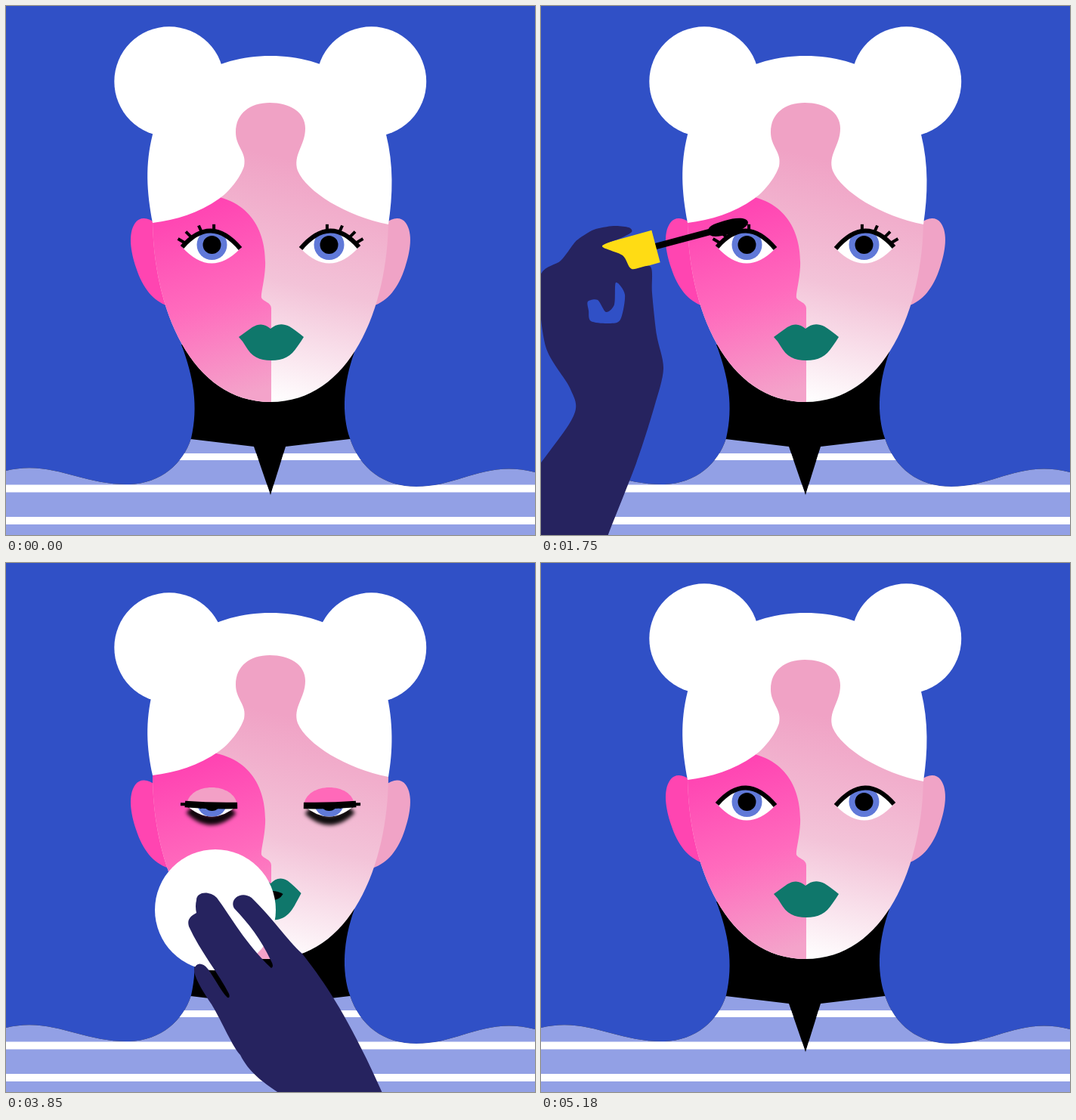
These frames come from a looping animation (700x700 px, 5250 ms). An HTML page with a canvas:

```html
<!DOCTYPE html>
<html>
<head>
<meta charset="utf-8">
<style>
html, body { margin: 0; width: 100%; height: 100%; overflow: hidden; background: #3050c6; }
canvas { display: block; }
</style>
</head>
<body>
<canvas id="stage" width="700" height="700"></canvas>
<script>
const ctx = document.getElementById('stage').getContext('2d');
const LOOP = 5250, STEP = 70;
const NAVY = '#26235f', BLUE = '#3050c6';

const body = new Path2D('M0 615C60 600 100 634 163 633C205 632 235 605 245 572C255 530 248 490 232 448L461 458C446 500 444 540 455 572C468 612 500 636 543 636C600 636 635 600 700 617V700H0Z');
const shirt = new Path2D('M0 573H244L328 583L350 647L370 583L455 573H700V700H0Z');
const face = new Path2D('M194 280C194 400 245 524 350 524C455 524 506 400 506 280L400 110H300Z');
const shade = new Path2D('M250 249C320 249 345 295 343 345C342 365 337 380 338 386C340 391 351 392 351 400V530H180V249Z');
const ear = new Path2D('M198 288C188 279 177 279 171 287C161 301 165 325 172 346C181 374 195 390 214 397Z');
const lips = new Path2D('M308 438Q319 430 326 425C336 419 343 421 350 427C357 421 365 419 375 424Q383 429 394 438Q391 443 386 450C377 464 367 469 351 469C335 469 325 464 317 450Q313 443 308 438Z');
const mouth = new Path2D('M334 441Q351 431 368 439Q358 452 334 441Z');
const wiper = new Path2D('M-25 -13C-25 -24 -8 -26 2 -16C20 8 40 45 74 77Q78 75 74 68C60 38 44 18 25 -2C18 -14 34 -26 48 -16C75 10 95 40 115 58C140 90 165 125 200 197C230 260 255 320 280 382L420 760H200L141 382C138 340 125 275 101 254C75 235 48 222 33 192C22 180 10 150 -5 125C-15 110 -25 95 -28 82C-28 70 -18 68 -10 78C0 92 8 108 16 116Q20 117 18 111C5 85 -20 55 -35 22C-38 12 -32 8 -25 4Q-27 -5 -25 -13Z');

// Two poses of the hand holding the wand, relative to the stage
const fistA = [-260,600, 0,433, 45,406, 62,375, 72,325, 110,275, 152,234, 178,234, 190,233, 212,232, 240,236, 268,253, 279,267,
  268,276, 238,264, 248,288, 250,306, 273,306, 255,338, 212,396, 185,437, 150,456, 100,505, 0,618, -150,790];
const fistB = [-160,800, 0,592, 46,525, 40,490, 8,435, 0,345, 28,322, 45,300, 52,293, 72,281, 98,276, 118,278, 122,284,
  108,292, 83,303, 110,315, 122,333, 147,330, 149,365, 155,420, 164,465, 152,515, 128,590, 85,700, 50,800];
const gapA = [172,303, 160,322, 165,338, 188,347, 207,340, 217,311, 204,317, 205,332, 186,333, 177,318];
const gapB = [64,376, 65,388, 68,402, 92,405, 107,400, 113,367, 101,351, 99,380, 88,390, 77,374];
const gripA = [319, 283], gripB = [154, 303];

// time, grip x, grip y, turn from pose A to pose B
const wandKeys = [[70,-150,430,0], [490,318,300,0], [560,332,298,0], [770,322,283,0], [980,350,300,0], [1260,319,283,0],
  [1470,345,296,0], [1750,152,318,1], [1960,154,303,1], [2130,150,316,1], [2310,154,303,1], [2870,-170,480,1]];
// time, pad x, pad y
const padKeys = [[3430,250,800], [3710,266,486], [3850,277,459], [3990,300,440], [4130,285,400], [4340,312,318], [4480,375,312],
  [4620,432,320], [4760,425,345], [4900,400,480], [5040,344,632], [5110,268,690], [5180,240,800]];
const tiltKeys = [[2870,0], [3360,1], [3990,1], [4480,0]];
const openKeys = [[2730,1], [2940,.42], [3850,.45], [4060,0], [4760,0], [4970,1]];
const mouthKeys = [[3640,0], [3850,1], [4060,1], [4270,0]];

// Bezier place, lean and reach of each lash, raised and lowered
const lashes = [[.06,-10,-6,5], [.17,-8,-8,10], [.34,-4,-9,14], [.55,0,-9,14], [.7,3,0,14], [.86,5,0,11]];

const mix = (a, b, u) => a + (b - a) * u;
const smooth = u => u * u * (3 - 2 * u);

function track(keys, t, ease = smooth) {
  if (t <= keys[0][0]) return keys[0].slice(1);
  const i = keys.findIndex(k => k[0] > t);
  if (i < 0) return keys.at(-1).slice(1);
  const a = keys[i - 1], b = keys[i], u = ease((t - a[0]) / (b[0] - a[0]));
  return a.slice(1).map((v, n) => mix(v, b[n + 1], u));
}

function fill(path, color, rule = 'nonzero') {
  ctx.fillStyle = color;
  ctx.fill(path, rule);
}

function disc(x, y, rx, color, ry = rx) {
  const p = new Path2D();
  p.ellipse(x, y, rx, ry, 0, 0, 7);
  fill(p, color);
}

function line(path, width, color = '#000') {
  ctx.lineWidth = width;
  ctx.strokeStyle = color;
  ctx.stroke(path);
}

function group(draw) {
  ctx.save();
  draw();
  ctx.restore();
}

const mirror = draw => group(() => {
  ctx.translate(700, 0);
  ctx.scale(-1, 1);
  draw();
});

function ramp(x0, y0, x1, y1, ...colors) {
  const g = ctx.createLinearGradient(x0, y0, x1, y1);
  colors.forEach((c, i) => g.addColorStop(i / (colors.length - 1), c));
  return g;
}
const skin = ramp(425, 215, 350, 524, '#f0a2c5', '#f3c3d8', '#ffffff');
const blush = ramp(225, 270, 300, 520, '#ff43b2', '#ff6bbd', '#f4a3ca');

function drawBody() {
  group(() => {
    ctx.clip(body);
    ctx.fillStyle = '#000';
    ctx.fillRect(0, 440, 700, 260);
    ctx.clip(shirt);
    ctx.fillStyle = '#92a0e5';
    ctx.fillRect(0, 570, 700, 130);
    ctx.fillStyle = '#fff';
    for (const [y, h] of [[592, 9], [633.5, 10], [676, 10]]) ctx.fillRect(0, y, 700, h);
  });
}

function drawHair(tilt) {
  const y = v => v - 6 * tilt;
  disc(216, 100 + 12 * tilt, 72.7, '#fff');
  disc(483.5, 100 + 12 * tilt, 72.7, '#fff');
  fill(new Path2D(`M194 ${y(287)}C186 245 184 210 194 170C212 105 275 66 350 66C425 66 488 105 503 170C513 210 512 250 506 ${y(289)}
    C450 ${y(278)} 398 ${y(246)} 386 ${y(218)}C379 ${y(197)} 396 ${y(185)} 396 ${y(162)}C396 ${y(140)} 375 ${y(128)} 349 ${y(128)}
    C323 ${y(128)} 304 ${y(142)} 304 ${y(167)}C304 ${y(187)} 319 ${y(193)} 315 ${y(212)}C310 ${y(228)} 294 ${y(247)} 282 ${y(255)}
    C255 ${y(274)} 225 ${y(283)} 194 ${y(287)}Z`), '#fff');
}

function drawEye(open, lashed, lidColor) {
  const shut = 1 - open, top = mix(275, 360, shut), low = Math.max(top, 361 - 18 * shut);
  const inset = Math.min(4, shut * 7), x0 = 233 + inset, x1 = 310 - inset;
  const lid = new Path2D(`M${x0} 319Q271 ${top} ${x1} 321`);
  const ball = new Path2D(`M${x0} 319Q271 ${top} ${x1} 321Q271 ${low} ${x0} 319Z`);
  if (lashed && shut > .05) group(() => {
    ctx.filter = 'blur(2.5px)';
    ctx.globalAlpha = Math.min(1, shut * 1.7);
    line(new Path2D(`M${x0 + 6} 326Q271 ${low + 3} ${x1 - 6} 327`), 13);
  });
  if (shut > .2) fill(new Path2D(`M239 321C241 289 303 289 306 321Q271 ${top} 239 321Z`), lidColor);
  group(() => {
    ctx.clip(ball);
    ctx.fillStyle = '#fff';
    ctx.fillRect(220, 280, 100, 70);
    disc(272.5, 316, 20, '#6079d8');
    disc(272.5, 316, 12, '#000');
  });
  line(lid, 6 + 5 * shut);
  if (!lashed) return;
  lashes.forEach(([u, dx, up, down], i) => {
    if (i > 3 && open > .3) return;
    const v = 1 - u;
    const x = v * v * x0 + 2 * u * v * 271 + u * u * x1;
    const y = v * v * 319 + 2 * u * v * top + u * u * 321;
    line(new Path2D(`M${x} ${y}l${dx} ${mix(up, down, shut)}`), 4);
  });
}

function drawHead(t) {
  const [tilt] = track(tiltKeys, t), [open] = track(openKeys, t), [part] = track(mouthKeys, t);
  group(() => {
    ctx.translate(0, 6.5 * tilt);
    fill(ear, '#ff45b1');
    mirror(() => fill(ear, '#f0a3c6'));
  });
  fill(face, skin);
  group(() => {
    ctx.clip(face);
    fill(shade, blush);
  });
  drawHair(tilt);
  drawEye(open, t < 4410, '#f3a0c6');
  mirror(() => drawEye(open, t < 4690, '#ff69b9'));
  group(() => {
    ctx.translate(351, 445);
    ctx.scale(1 - .08 * part, 1 + .15 * part);
    ctx.translate(-351, -445);
    fill(lips, '#0f776b');
    ctx.globalAlpha = part;
    fill(mouth, '#000');
  });
}

// Closed smooth curve through a flat list of points
function addLoop(path, pts) {
  const n = pts.length / 2;
  const p = (i, c) => pts[(i + n) % n * 2 + c];
  const ctl = (i, c, s) => p(i, c) + s * (p(i + 1, c) - p(i - 1, c)) / 7;
  path.moveTo(pts[0], pts[1]);
  for (let i = 0; i < n; i++)
    path.bezierCurveTo(ctl(i, 0, 1), ctl(i, 1, 1), ctl(i + 1, 0, -1), ctl(i + 1, 1, -1), p(i + 1, 0), p(i + 1, 1));
  path.closePath();
}

function drawWand(t) {
  if (t <= 70 || t >= 2870) return;
  const [x, y, turn] = track(wandKeys, t);
  const pose = (a, b) => a.map((v, i) => mix(v - gripA[i % 2], b[i] - gripB[i % 2], turn));
  const fist = new Path2D();
  addLoop(fist, pose(fistA, fistB));
  addLoop(fist, pose(gapA, gapB));
  group(() => {
    ctx.translate(x, y);
    group(() => {
      ctx.rotate(-.26 * turn);
      line(new Path2D('M-2 0H80'), 8.5);
      fill(new Path2D('M72 0C72 -8 80 -9 96 -9.5C114 -10 126 -6 126 0C126 6 114 9 100 9.5C82 9 72 8 72 0Z'), '#000');
      fill(new Path2D('M0 -22V22L-68 23L-84 -21Z'), '#ffdc14');
    });
    fill(fist, NAVY, 'evenodd');
  });
}

function drawPad(t) {
  if (t <= 3430 || t >= 5180) return;
  const [x, y] = track(padKeys, t, u => u);
  group(() => {
    ctx.translate(x, y);
    disc(0, 0, 80, '#fff');
    fill(wiper, NAVY);
  });
}

function frame() {
  const t = Math.floor(performance.now() % LOOP / STEP) * STEP;
  ctx.fillStyle = BLUE;
  ctx.fillRect(0, 0, 700, 700);
  drawBody();
  drawHead(t);
  drawWand(t);
  drawPad(t);
  requestAnimationFrame(frame);
}
frame();
</script>
</body>
</html>
```
